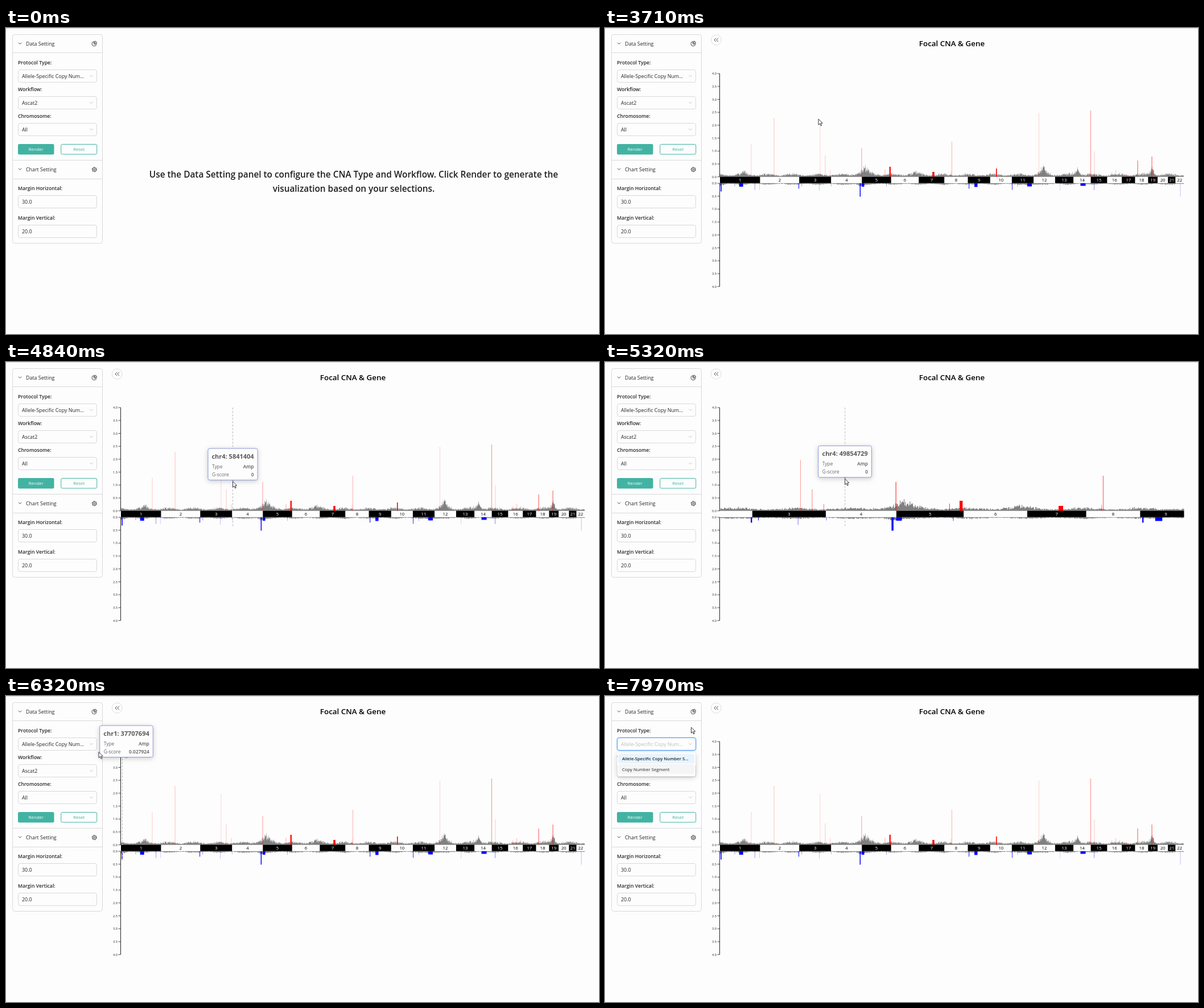
An HTML page for the animation above (8 s loop, 1042x538 px).

```html
<!DOCTYPE html>
<html lang="en">
<head>
<meta charset="utf-8">
<title>Focal CNA &amp; Gene</title>
<style>
html, body { margin: 0; width: 100%; height: 100%; overflow: hidden; background: #fdfdfd; }
svg { display: block; width: 1042px; height: 538px; }
text { font-family: "Open Sans", "Noto Sans", sans-serif; white-space: pre; }
.b { font-weight: 600; }
.box { fill: #fdfdfd; stroke: #d9d9d9; }
.line { fill: none; stroke: #333; stroke-width: .9; }
.mid { text-anchor: middle; }
.end { text-anchor: end; }
.float { filter: drop-shadow(0 2px 4px rgba(0, 0, 0, .2)); }
</style>
</head>
<body>
<svg id="stage" viewBox="0 0 1042 538">
  <defs><clipPath id="plot"><rect x="202" y="60" width="815.5" height="400"/></clipPath></defs>
</svg>
<script>
const LOOP = 8000, LEFT = 202, WIDTH = 815, UNIT = 45.4, PIVOT = 404.7;
const TEAL = '#42b3a3', INK = '#262626';
const stage = document.getElementById('stage');

function el(parent, tag, attrs = {}, text) {
  const node = document.createElementNS('http://www.w3.org/2000/svg', tag);
  for (const name in attrs) node.setAttribute(name, attrs[name]);
  if (text !== undefined) node.textContent = text;
  parent.appendChild(node);
  return node;
}
const group = (parent, attrs) => el(parent, 'g', attrs);
const rect = (parent, x, y, width, height, attrs) => el(parent, 'rect', { x, y, width, height, ...attrs });
const path = (parent, d, attrs) => el(parent, 'path', { d, ...attrs });
const label = (parent, x, y, text, size = 8.9, cls = '', fill = INK) =>
  el(parent, 'text', { x, y, 'font-size': size, class: cls, fill }, text);
const show = (node, on) => node.setAttribute('visibility', on ? 'visible' : 'hidden');
const ramp = (t, from, to) => Math.min(1, Math.max(0, (t - from) / (to - from)));

function seeded(seed) {
  return () => {
    seed = (seed * 1664525 + 1013904223) >>> 0;
    return seed / 4294967296;
  };
}

/* Side panel */
rect(stage, 0, 0, 1042, 1, { fill: '#d9d9d9' });
const panel = group(stage);
rect(panel, 11.5, 11.5, 158, 367, { rx: 4, class: 'box' });
for (const y of [43.5, 232.5, 265.5]) path(panel, `M11.5 ${y}H169.5`, { stroke: '#d9d9d9' });

function chevron(x, y, r, color) {
  path(panel, `M${x - r} ${y - r / 2}l${r} ${r}l${r} ${-r}`, { class: 'line', style: `stroke:${color}` });
}
function header(title, y) {
  chevron(24.5, y - 4, 2.6, '#333');
  label(panel, 35, y, title);
}
header('Data Setting', 31);
header('Chart Setting', 252);

// Pie and gear icons
path(panel, 'M154.5 23.8A4 4 0 1 0 158.9 28.3H154.5Z', { class: 'line' });
path(panel, 'M156 23A4 4 0 0 1 159.6 26.7H156Z', { class: 'line' });
const gear = group(panel, { transform: 'translate(155.3 248.8)', class: 'line' });
el(gear, 'circle', { r: 3.4 });
el(gear, 'circle', { r: 1.4 });
el(gear, 'circle', { r: 4.1, 'stroke-dasharray': '2 2.29' });

function field(title, titleY, y, value, isSelect) {
  label(panel, 21, titleY, title, 8.7, 'b');
  const box = rect(panel, 21.5, y + .5, 138, 22, { rx: 3.5, class: 'box' });
  const text = label(panel, 28, y + 14.7, value);
  if (isSelect) chevron(150, y + 11.3, 2.8, '#bfbfbf');
  return { box, text };
}
const glow = rect(panel, 20.5, 72.5, 140, 24, { rx: 4.5, fill: 'none', stroke: '#d3e6ff', 'stroke-width': 1.5 });
const protocol = field('Protocol Type:', 64, 73, 'Allele-Specific Copy Num...', true);
field('Workflow:', 111, 120, 'Ascat2', true);
field('Chromosome:', 158, 167, 'All', true);
field('Margin Horizontal:', 285, 294, '30.0');
field('Margin Vertical:', 337, 346, '20.0');

const wave = rect(panel, 20, 203, 65, 20, { rx: 3.5, fill: 'none', stroke: TEAL, 'stroke-width': 2 });
rect(panel, 21, 204, 63.5, 18.5, { rx: 2.5, fill: TEAL });
label(panel, 52.7, 216, 'Render', 7.8, 'mid', '#fdfdfd');
rect(panel, 96.7, 204.5, 63, 17.5, { rx: 2.5, fill: '#fdfdfd', stroke: TEAL });
label(panel, 128.2, 216, 'Reset', 7.8, 'mid', TEAL);

/* Opening hint */
const hint = group(stage);
label(hint, 611, 263, 'Use the Data Setting panel to configure the CNA Type and Workflow. Click Render to generate the', 15.37, 'b mid', '#1f1f1f');
label(hint, 611, 288.3, 'visualization based on your selections.', 15.37, 'b mid', '#1f1f1f');

/* Chart */
const chart = group(stage);
el(chart, 'circle', { cx: 195.3, cy: 21, r: 9, fill: '#fdfdfd', stroke: '#dedede' });
path(chart, 'M195 17.8l-3 3.2l3 3.2M198.8 17.8l-3 3.2l3 3.2', { class: 'line' });
label(chart, 609.5, 32, 'Focal CNA & Gene', 13.4, 'b mid', '#000');

function axis(zero, dir) {
  path(chart, `M201.5 ${zero}V${zero + dir * 4 * UNIT}`, { stroke: '#222' });
  for (let i = 0; i <= 8; i++) {
    const y = zero + dir * i * UNIT / 2;
    path(chart, `M197.5 ${y}H201.5`, { stroke: '#222', 'stroke-width': .8 });
    label(chart, 196, y + 2, (i / 2).toFixed(1), 5.7, 'end');
  }
}
axis(261.7, -1);
axis(273, 1);

const plot = group(chart, { 'clip-path': 'url(#plot)' });
const bars = group(plot);

// Ragged grey band: gentle swell plus humps of [x, height, falloff]
function profile(low, swell, humps, base, dir, seed) {
  const rand = seeded(seed);
  let d = `M${LEFT} ${base}`;
  for (let x = LEFT; x < LEFT + WIDTH; x += .5) {
    let h = low + swell * Math.sin(x / 14) ** 2;
    for (const [c, top, fall] of humps) h += top * Math.exp(-Math.abs(x - c) / fall);
    h *= .3 + .5 * rand() + .25 * rand() ** 4;
    d += `V${(base + dir * h).toFixed(1)}H${x + .5}`;
  }
  path(bars, d + `V${base}Z`, { fill: '#808080' });
}
profile(4, 4, [[244, 10, 4], [457, 20, 9], [545, 7, 8], [770, 25, 5], [830, 18, 4], [961, 22, 3]], 262, -1, 7);
profile(2, 2, [[202, 5, 6], [448, 7, 5], [746, 4, 8]], 272.5, 1, 23);

// Key peaks of [x, height, width], then a scatter of faint thin ones
function peaks(key, count, base, dir, fill, seed) {
  const rand = seeded(seed);
  const minor = Array.from({ length: count }, () => [LEFT + WIDTH * rand(), 5 + 14 * rand() ** 2, .15 + .3 * rand()]);
  const d = [...key, ...minor].map(([x, h, w]) => `M${x - w / 2} ${base}v${dir * h}h${w}v${-dir * h}z`);
  path(bars, d.join(''), { fill });
}
peaks([[257, 58, .2], [297, 104, .25], [378, 90, .17], [387, 38, .22], [451, 51, .4], [500.8, 18, 2.3],
  [577, 9, 3.5], [609.3, 62, .3], [687.8, 15, 1.6], [762.6, 113, .18], [853.3, 117, .45], [860, 45, .2],
  [936, 29, .7], [961, 36, .7]], 8, 262, -1, '#f00', 5);
peaks([[204, 15, 1.6], [239, 6.5, 6.5], [340.6, 10, 1], [448.4, 24, 1.5], [453.4, 6.5, 4.3], [639.7, 10, 1],
  [651.8, 7, 5.4], [715.4, 12, .8], [746, 6, 8], [840, 5, 9], [1011, 24, .25]], 14, 272.5, 1, '#00f', 11);

// Chromosome lengths in Mb
const sizes = [249, 242, 198, 190, 181.5, 171, 159, 145, 138.5, 134, 135, 133, 114, 107, 102, 90, 83, 80, 59, 64, 47, 51];
const genome = sizes.reduce((a, b) => a + b);
const starts = sizes.map((_, i) => sizes.slice(0, i).reduce((a, b) => a + b, 0));
const chromX = mb => LEFT + mb / genome * WIDTH;

const names = sizes.map((size, i) => {
  const [ground, ink] = i % 2 ? ['#fdfdfd', '#000'] : ['#000', '#fdfdfd'];
  rect(bars, chromX(starts[i]), 261.7, size / genome * WIDTH, 11, { fill: ground });
  return label(plot, 0, 270, i + 1, 7.8, 'mid', ink);
});

/* Dropdown */
const menu = group(stage);
rect(menu, 21.5, 99, 137.5, 42, { rx: 4, fill: '#fdfdfd', class: 'float' });
rect(menu, 23.5, 101.5, 133.5, 17, { rx: 2.5, fill: '#e6f4ff' });
const hovered = rect(menu, 23.5, 120, 133.5, 17, { rx: 2.5, fill: '#f5f5f5' });
label(menu, 30, 113, 'Allele-Specific Copy Number S...', 7.7, 'b');
label(menu, 30, 131.5, 'Copy Number Segment', 7.7);

/* Tooltip */
const guide = path(stage, 'M0 80V262M0 273V290', { stroke: '#b9bdbd', 'stroke-dasharray': '3.5 2.5' });
const tip = group(stage);
const tipBox = rect(tip, 0, -56, 90, 55.5, { rx: 3, fill: '#fdfdfd', stroke: '#8f9bd8', class: 'float' });
path(tip, 'M-3 -.8L0 2L3 -.8Z', { fill: '#8f9bd8' });
const tipTitle = label(tip, 0, -38.5, '', 11, 'mid', '#595959');
tipTitle.style.fontWeight = 700;
const tipRows = [['Type', 'Amp', -21], ['G-score', '0', -7.5]].map(([name, value, y]) => [
  label(tip, 0, y, name, 8.4, '', '#666'),
  label(tip, 0, y, value, 8.4, 'b end', '#555')
]);

const cursor = path(stage, 'M0 0V10.2L2.4 8.1L4.1 11.9L5.8 11.1L4.1 7.5L7.2 7.2Z',
  { fill: '#fdfdfd', stroke: '#222', 'stroke-width': .9, 'stroke-linejoin': 'round' });

/* Motion */
// Moves: start, end, target x, y, optional bend point
const moves = [
  [40, 680, 33, 212, 600, 190],
  [960, 1240, 375, 160],
  [4120, 4840, 398.5, 210],
  [5200, 5560, 468, 196],
  [6000, 6320, 163, 98.5],
  [6320, 6600, 75, 86],
  [6840, 7160, 75, 130],
  [7520, 7960, 151.5, 55, 260, 190]
];
function pointer(t) {
  let x = 645, y = 5;
  for (const [from, to, tx, ty, bx = (x + tx) / 2, by = (y + ty) / 2] of moves) {
    const p = ramp(t, from, to), q = 1 - p;
    x = q * q * x + 2 * q * p * bx + p * p * tx;
    y = q * q * y + 2 * q * p * by + p * p * ty;
    if (p < 1) break;
  }
  return [x, y];
}

// Genome position under the pointer, gliding between the readings
const chr4 = starts[3] * 1e6;
function reading(t) {
  const glide = (a, b, from, to) => a + (b - a) * ramp(t, from, to);
  if (t < 5200) return glide(610e6, chr4 + 5841404, 4120, 4840);
  if (t < 6000) return glide(chr4 + 5841404, chr4 + 137881378, 5200, 5560);
  return glide(chr4 + 137881378, 37707694, 6000, 6320);
}

function drawZoom(t) {
  const k = 1 + 1.3 * ramp(t, 4880, 5200) - .8 * ramp(t, 5680, 5840) - .5 * ramp(t, 6000, 6120);
  const shift = PIVOT * (1 - k);
  bars.setAttribute('transform', `matrix(${k} 0 0 1 ${shift} 0)`);
  names.forEach((name, i) => name.setAttribute('x', chromX(starts[i] + sizes[i] / 2) * k + shift));
}

function drawTip(t, x, y) {
  const on = t >= 4160 && t < 6440;
  show(tip, on);
  show(guide, on);
  if (!on) return;
  const place = reading(t);
  const c = starts.findLastIndex(mb => mb * 1e6 <= place);
  const bp = String(Math.round(place - starts[c] * 1e6));
  const w = 42 + 6.45 * bp.length;
  guide.setAttribute('transform', `translate(${Math.max(x, 204.5)} 0)`);
  tip.setAttribute('transform', `translate(${Math.max(x, 211.5)} ${Math.max(y - 2, 108)})`);
  tipBox.setAttribute('x', -w / 2);
  tipBox.setAttribute('width', w);
  tipTitle.textContent = `chr${c + 1}: ${bp}`;
  for (const [name, value] of tipRows) {
    name.setAttribute('x', 7 - w / 2);
    value.setAttribute('x', w / 2 - 6.5);
  }
  tipRows[1][1].textContent = c ? '0' : '0.027924';
}

function drawMenu(t) {
  const open = t >= 6840, ease = 1 - (1 - ramp(t, 6800, 7040)) ** 3, scale = .8 + .2 * ease;
  show(menu, open);
  show(glow, open);
  show(hovered, t >= 7040);
  menu.setAttribute('opacity', ease);
  menu.setAttribute('transform', `translate(0 ${99 * (1 - scale)}) scale(1 ${scale})`);
  protocol.box.style.stroke = t >= 6360 ? '#4f9bfa' : '#d9d9d9';
  protocol.text.setAttribute('fill', open ? '#bfbfbf' : INK);
}

function draw(now) {
  const t = now % LOOP, step = Math.floor(t / 40) * 40;
  const ready = t >= 3710, [x, y] = pointer(step);
  show(hint, !ready);
  chart.style.display = ready ? '' : 'none';
  wave.setAttribute('opacity', t < 970 ? 0 : .35 * (1 - ramp(t, 970, 1250)));
  drawZoom(step);
  drawTip(step, x, y);
  drawMenu(step);
  show(cursor, t >= 40);
  cursor.setAttribute('transform', `translate(${x} ${y})`);
}

const begin = performance.now();
function frame() {
  draw(performance.now() - begin);
  requestAnimationFrame(frame);
}
frame();
</script>
</body>
</html>
```
